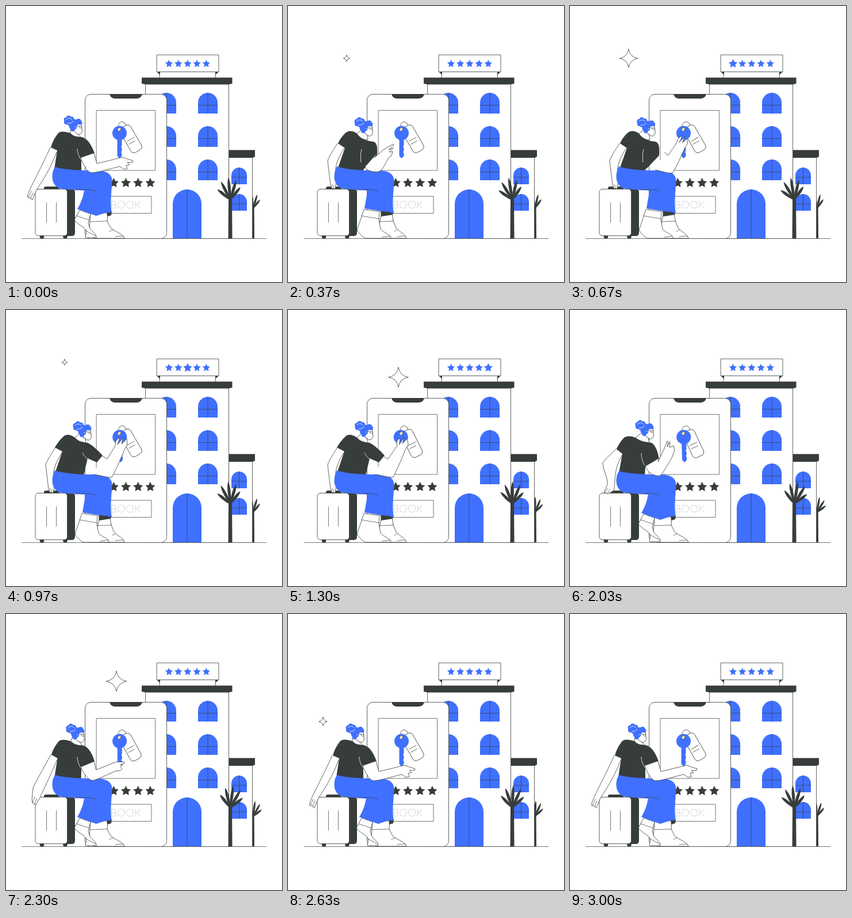
Write an HTML page that moves like this. It is 480x480 px and loops after 3.03 s.

```html
<!DOCTYPE html>
<html lang="en">
<head>
<meta charset="utf-8">
<title>Hotel booking</title>
<style>
html, body { margin: 0; width: 100%; height: 100%; overflow: hidden; background: #fff; }
svg { display: block; width: 100vw; height: 100vh; }
.line { fill: #fff; stroke: #373d3b; stroke-width: .8; stroke-linejoin: round; stroke-linecap: round; }
.thin { fill: none; stroke: #373d3b; stroke-width: .7; stroke-linecap: round; }
.crease { fill: none; stroke: #fff; stroke-width: .8; }
.blue { fill: #4070ff; }
.dark { fill: #373d3b; }
text { font: 100 18px Lato, Inter, sans-serif; letter-spacing: .8px; fill: #373d3b; }
</style>
</head>
<body>
<svg viewBox="0 0 480 480">
  <path class="thin" d="M28 404.5H453"/>
  <g id="smallPalm"></g>

  <path class="line" d="M387.5 262H428.5V404.5H387.5Z"/>
  <path class="dark" d="M387 250.500H433V262L429 264H387Z"/>
  <path class="line" d="M243 134H387.5V404.5H243ZM267.5 113H364.5V126H267.5Z"/>
  <path class="dark" d="M236 124.500H393.5V135L387 136.500H243L236 135ZM262 114H268V120ZM370 114H364V120Z"/>
  <rect class="line" x="262.5" y="85" width="107.5" height="29.5"/>
  <g id="windows"></g>
  <g id="signStars" class="blue"></g>
  <g id="palm"></g>

  <rect class="line" x="137.5" y="153.5" width="142" height="251" rx="10"/>
  <path class="dark" d="M180 153H237Q235 161 227 161H190Q182 161 180 153Z"/>
  <path class="thin" d="M157.500 181.500H259.500V286H157.500ZM170 331H253V360.500H170Z"/>
  <g id="rating" class="dark"></g>
  <text x="208.400" y="352" text-anchor="middle">BOOK</text>

  <g id="tag">
    <g transform="translate(202 208) rotate(-30)">
      <circle class="thin" r="6.500"/>
      <rect class="line" x="-9" y="3" width="21" height="49" rx="6"/>
      <path class="thin" d="M-6 28H8M-6 34H6"/>
    </g>
  </g>
  <g id="key">
    <circle class="blue" cx="197.500" cy="221" r="12.500"/>
    <path class="blue" d="M193.500 232H201.500V243L200 245L201.500 247V252L200 254L201.500 256V261L197.500 265L193.500 261Z"/>
    <circle class="line" cx="197" cy="214.500" r="3.200"/>
    <path class="thin" d="M194 212L199 216"/>
  </g>

  <path class="dark" d="M100 318H114Q120 318 120 324V394Q120 400 114 400H100ZM66 319V317Q66 314 69 314H90Q93 314 93 317V319Z"/>
  <circle class="dark" cx="62.500" cy="401" r="3.800"/>
  <circle class="dark" cx="103" cy="401" r="3.800"/>
  <rect class="line" x="51" y="318.500" width="55.500" height="81" rx="5"/>
  <path class="thin" d="M70.500 342V376M87.500 342V376"/>

  <g id="body"></g>
  <g id="head">
    <path class="line" d="M118 206L131 205L132 213L132.500 217L131.500 220Q130 224 125 223L117 217Z"/>
    <g id="hair" class="blue"></g>
    <path class="crease" d="M104 198Q110 192 115 198M107 204Q114 205 117 200M120 211Q121 207 124 210"/>
    <path class="thin" d="M121 208.500L132 209.500M126.500 209Q127 213.500 131.500 212"/>
  </g>
  <g id="front"></g>
  <g id="sparkles"></g>
</svg>
<script>
const LOOP = 3030;
const $ = id => document.getElementById(id);

function add(parent, tag, attrs) {
  const el = document.createElementNS('http://www.w3.org/2000/svg', tag);
  for (const name in attrs) el.setAttribute(name, attrs[name]);
  return parent.appendChild(el);
}

function starPath(r) {
  let d = '';
  for (let i = 0; i < 10; i++) {
    const a = i * Math.PI / 5, q = i % 2 ? r * .5 : r;
    d += (i ? 'L' : 'M') + (q * Math.sin(a)).toFixed(2) + ' ' + (-q * Math.cos(a)).toFixed(2);
  }
  return d + 'Z';
}

// Arched windows and door
function arch(cx, top, w, bottom, bar) {
  const r = w / 2;
  add($('windows'), 'path', { class: 'blue', d: `M${cx - r} ${bottom}V${top + r}A${r} ${r} 0 0 1 ${cx + r} ${top + r}V${bottom}Z` });
  add($('windows'), 'path', { class: 'thin', d: `M${cx} ${top}V${bottom}` + (bar ? `M${cx - r} ${bar}H${cx + r}` : '') });
}
for (const y of [151, 209, 267]) for (const x of [279, 351]) arch(x, y, 34, y + 36, y + 21.5);
for (const y of [281, 327]) arch(405.5, y, 27, y + 29, y + 17);
arch(315, 319, 50, 404);

const signStars = [0, 1, 2, 3, 4].map(() => add($('signStars'), 'path', { d: starPath(7) }));
for (let i = 0; i < 4; i++) add($('rating'), 'path', { d: starPath(9), transform: `translate(${187.3 + i * 21.2} 307.800)` });

// Palms
function palm(id, x, y, scale) {
  const g = add($(id), 'g', { class: 'dark', transform: `translate(${x} ${y}) scale(${scale})` });
  add(g, 'path', { d: `M-3 -4H3L3.500 ${(404 - y) / scale}H-3.500Z` });
  return [[-46, 29], [-22, 36], [0, 39], [22, 36], [44, 28]].map(([angle, len]) => ({
    angle, el: add(g, 'path', { d: `M-1 0C-3 ${-.4 * len} -3.500 ${-.8 * len} 0 ${-len}C3.500 ${-.8 * len} 3 ${-.4 * len} 1 0Z` })
  }));
}
const leaves = [...palm('palm', 390, 337, 1), ...palm('smallPalm', 429.5, 352, .7)];

for (const [x, y, r] of [[105, 198, 4.5], [109, 195, 4.5], [114, 197, 4.5], [115, 202, 4], [110, 203, 5], [105, 202, 4],
  [115, 209, 5.5], [120, 203, 6], [126, 201, 5], [129, 203, 3.5], [116, 214, 4], [119, 210, 4.5]])
  add($('hair'), 'circle', { cx: x, cy: y, r });

// Poses are blended number by number; each part's order picks one pose per time
const TIMES = [0, 370, 800, 970, 1670, 2030, 2450, 3030];
const BODY = '01111200', LEGS = '01111000', REACH = '01122300';
const parts = [];
function part(parent, cls, order, ...poses) {
  parts.push({ el: add($(parent), 'path', { class: cls }), order, poses });
}

// Legs
part('body', 'line', LEGS,
  'M147 361L145 386C142 394 146 399 153 404L180 404L206 404C204 396 188 392 182 386L176 374L177 360Z',
  'M163 360L158 382C158 394 163 398 170 404L185 404L206 404C204 396 192 392 188 386L183 374L181 360Z');
part('body', 'thin', LEGS,
  'M146 375L176 374M190 401L204 400M180 392L186 389', 'M160 375L184 374M190 401L204 400M185 392L190 389');
part('body', 'line', LEGS,
  'M128 355L119 372C124 380 136 384 140 391L138 403L157 403C158 396 149 392 146 387L143 378L147 362Z',
  'M132 354L120 390C124 396 128 400 134 404L150 404L179 404C178 396 168 396 161 388L158 372L159 358Z');
part('body', 'thin', LEGS,
  'M123 365L144 372M139 391L156 400', 'M128 365L158 370M164 402L178 400');
// Resting arm
part('body', 'line', BODY,
  'M77 246C68 266 56 290 44 314C40 322 38 328 37 332L42 334L46 337L52 322C56 314 74 292 88 254',
  'M86 239C80 249 72 260 69 269C70 280 73 300 74 313L76 317L82 318L84 306C82 295 78 276 98 247',
  'M81 241C72 250 60 260 57 266C58 280 66 292 65 304L59 317L66 320L76 314C80 300 74 280 91 252');
part('body', 'thin', BODY,
  'M39 333L44 322M43 335L47 325', 'M76 316L77 310M79 317L80 312', 'M61 317L66 310M65 319L70 312');
// Neck and shirt
part('body', 'line', BODY,
  'M113 211L112 221C116 227 122 229 130 228L123 221Z',
  'M128 215L120 222C123 230 130 233 139 232L138 225Z',
  'M126 212L114 222C120 229 130 231 138 230L136 223Z');
part('body', 'dark', REACH,
  'M112 221C102 218 94 217 90 222C84 230 80 238 78 246L89 251L84 284L131 290L131 264L131 264L154 256C148 240 142 231 132 228C124 228 116 226 112 221Z',
  'M120 222C112 216 105 217 101 220C95 225 90 232 87 239L99 247L86 284L130 287L132 283L134 282L155 260C156 246 155 238 149 236C140 235 128 233 120 222Z',
  'M120 222C112 216 105 216 101 219C94 225 89 232 85 239L98 246L85 284L135 288L142 258L158 265L168 253C160 244 150 235 142 231C135 230 126 229 120 222Z',
  'M114 222C104 218 97 219 93 223C87 230 83 236 81 242L91 250L85 284L130 287L131 274L132 272L155 260C153 246 149 236 142 231C132 230 122 228 114 222Z');
part('body', 'crease', REACH,
  'M124 248C124 256 127 262 131 268', 'M128 249C126 256 126 264 127 272',
  'M133 248C134 252 138 256 142 259', 'M124 249C124 256 126 264 130 270');

// Trousers
part('front', 'dark', LEGS,
  'M175 357L184 357L183 364L176 366Z', 'M161 356L184 357L182 363L162 366Z');
part('front', 'blue', LEGS,
  'M85 280C105 286 140 286 160 286C180 287 187 296 184 312C183 330 181 345 184 359L175 359L157 365L124 353C132 340 134 330 136 321C122 320 105 319 92 317C82 312 78 300 82 286Z',
  'M85 279C105 286 140 286 160 286C180 287 187 296 184 312C183 330 181 345 184 361L176 358L162 357L133 352C135 340 137 330 138 321C122 320 105 319 92 317C82 312 78 300 82 286Z');
part('front', 'thin', LEGS,
  'M120 320C134 319 148 318 156 322', 'M120 320C134 319 148 318 156 322');
// Reaching arm
part('front', 'line', '01223400',
  'M153 256L158 274L203 263L211 266L221 269L220 272L211 272L215 276L209 277L211 283L205 284L198 279C180 283 160 290 148 290C140 288 134 274 130 264',
  'M155 256L150 264L167 249L174 245L183 240L184 242L175 250L183 247L176 254L182 253L180 260L175 264C170 272 165 285 158 288C148 290 136 286 134 280',
  'M167 254L176 259L190 236L191 228L196 222L197 225L194 234L204 222L201 233L210 224L211 234L206 243C199 260 192 276 184 291C176 292 164 287 152 286',
  'M165 255L171 260L189 237L187 229L190 224L192 226L193 234L199 221L197 231L204 224L207 234L202 242C196 258 189 276 182 290C174 292 162 287 150 286',
  'M155 258L153 264L163 243L166 236L169 228L171 229L169 238L174 229L173 239L180 236L182 244L177 257C172 266 163 282 157 288C148 290 136 284 131 272');

const NUM = /-?\d+(\.\d+)?/g;
function blend(a, b, k) {
  const to = b.match(NUM);
  let i = 0;
  return a.replace(NUM, n => (+n + (to[i++] - n) * k).toFixed(2));
}

// x, y, peak radius, start, end
const sparkles = [[102, 91, 16, 285, 1050], [192, 117, 18, 990, 1752], [192, 117, 18, 2050, 2610], [61, 187, 18, 2575, 2990]]
  .map(([x, y, r, from, to]) => ({
    r, from, to, el: add(add($('sparkles'), 'g', { transform: `translate(${x} ${y})` }), 'path', { class: 'line' })
  }));

function draw(t) {
  let i = 0;
  while (t >= TIMES[i + 1]) i++;
  const u = (t - TIMES[i]) / (TIMES[i + 1] - TIMES[i]);
  const k = u * u * (3 - 2 * u);
  const keyed = values => values[i] + (values[i + 1] - values[i]) * k;

  for (const { el, order, poses } of parts)
    el.setAttribute('d', blend(poses[order[i]], poses[order[i + 1]], k));

  const headX = keyed([0, 15, 16, 16, 15, 13, 0, 0]), headY = keyed([0, 3, 3, 3, 2, 1, 0, 0]);
  $('head').setAttribute('transform', `translate(${headX} ${headY})`);
  $('key').setAttribute('transform', `rotate(${keyed([0, 0, 0, -2, 25, -2, 0, 0])} 197 214)`);
  $('tag').setAttribute('transform', `rotate(${keyed([0, 0, 0, 0, 8, 5, 0, 0])} 201 206)`);

  const sway = -9.5 * Math.cos(2 * Math.PI * (t - 500) / LOOP);
  for (const { el, angle } of leaves) el.setAttribute('transform', `rotate(${angle + sway})`);

  signStars.forEach((el, n) => {
    const d = (t - 710 - n * 130) / 130;
    const s = 1 + .18 * Math.max(0, 1 - d * d);
    el.setAttribute('transform', `translate(${283.5 + n * 16.2} 100.500) scale(${s})`);
  });

  for (const { el, r, from, to } of sparkles) {
    const p = (t - from) / (to - from);
    const s = p > 0 && p < 1 ? r * Math.sin(Math.PI * p) : 0;
    const q = s * .14;
    el.setAttribute('d', s ? `M0 ${-s}Q${q} ${-q} ${s} 0Q${q} ${q} 0 ${s}Q${-q} ${q} ${-s} 0Q${-q} ${-q} 0 ${-s}Z` : '');
  }
}

const start = performance.now();
function tick() {
  draw((performance.now() - start) % LOOP);
  requestAnimationFrame(tick);
}
tick();
</script>
</body>
</html>
```
